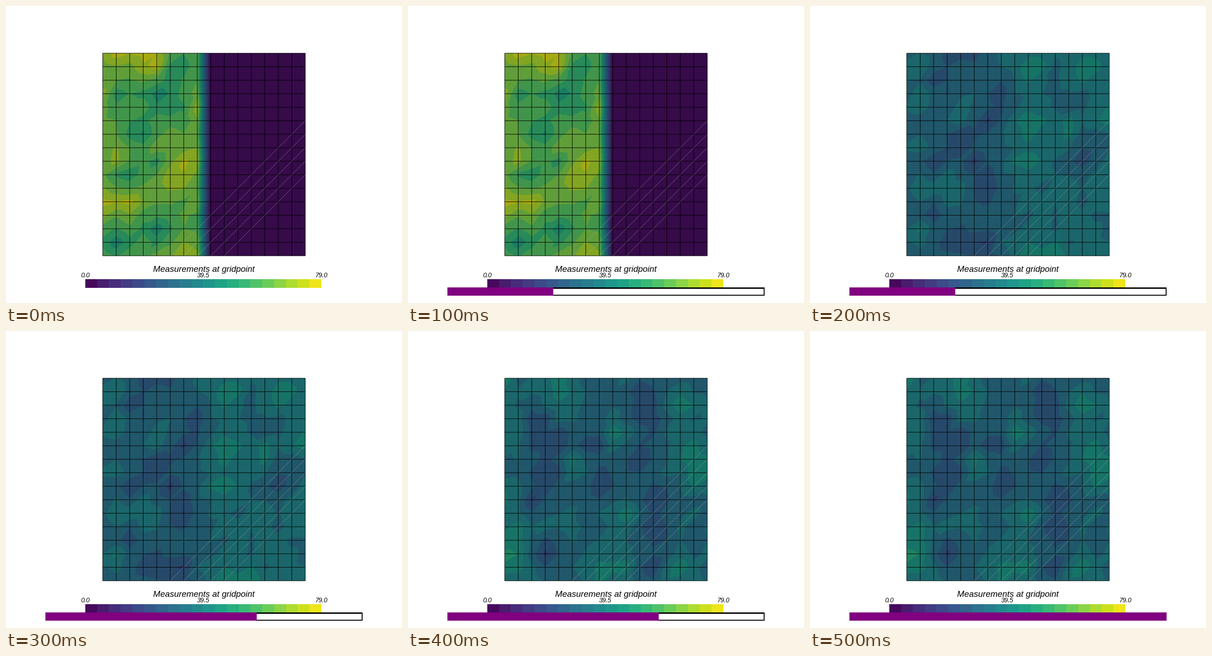
A matplotlib script for the animation above (0.6 s loop, 864 by 648 pixels).

```python
import matplotlib.pyplot as plt
import numpy as np
from matplotlib.animation import FuncAnimation
from matplotlib.patches import Rectangle

W, H, DPI = 864, 648, 100
PX = 72 / DPI
LEFT, TOP, SIDE, CELLS = 211, 103, 442, 15
RIGHT, BOTTOM = LEFT + SIDE, TOP + SIDE
STEP = SIDE / CELLS
SHADE = 0.75
VIRIDIS = plt.get_cmap("viridis")
ROWS, COLS = np.mgrid[:CELLS + 1, :CELLS + 1]


def bumps(points, spread=0.75):
    """Sum of round hills at (row, column) positions."""
    return sum(np.exp(-((ROWS - r)**2 + (COLS - c)**2) / (2 * spread**2))
               for r, c in points)


def measure(base, height, peaks, depth, dips, seed):
    """Node values: level ground, hills, hollows and a little noise."""
    noise = np.random.default_rng(seed).normal(0, 0.3, ROWS.shape)
    return base + height * bumps(peaks) - depth * bumps(dips) + noise


def render(nodes, centre, step):
    """Interpolate over triangles, then colour in bands around centre."""
    t = (np.arange(SIDE) + 0.5) / STEP
    cell = t.astype(int)
    r, c = np.meshgrid(cell, cell, indexing="ij")
    w, u = np.meshgrid(t - cell, t - cell, indexing="ij")
    a, b = nodes[r, c], nodes[r, c + 1]
    d, e = nodes[r + 1, c], nodes[r + 1, c + 1]
    z = np.where(u + w <= 1, a + u * (b - a) + w * (d - a),
                 e + (1 - u) * (d - e) + (1 - w) * (b - e))
    value = np.clip(centre + step * np.round(z), 0, 1)
    return VIRIDIS(value)[..., :3] * SHADE


def box(x0, y0, x1, y1, color, z):
    return ax.add_patch(Rectangle((x0, y0), x1 - x0, y1 - y0, fc=color, lw=0, zorder=z))


def label(x, baseline, text, size):
    ax.text(x, baseline, text, family="Liberation Sans", style="italic",
            size=size * PX, ha="center", va="baseline", zorder=6)


hot = measure(
    0.55, 2.3,
    [(0, 1), (0, 3), (1, 4), (3, 0), (4, 7), (7, 4), (8, 1), (8, 6.5), (9, 5),
     (11, 0), (11, 1.7), (15, 6)],
    2.7,
    [(3, 1), (3, 4), (4, 5.7), (1, 5.5), (6, 3), (8, 4), (9, 1.5), (13, 4), (14, 1)],
    seed=1)
hot[:, 8:] = -10.5  # the right half reads zero

even = measure(
    np.linspace(-0.1, 0.9, CELLS + 1), 1.8,
    [(1, 1), (1, 9), (1, 13), (3.5, 1), (5, 4), (5, 9), (5, 12), (5, 14.5),
     (7, 1), (8, 9), (10, 1), (10, 3), (13, 1), (15, 9), (15, 11)],
    1.8,
    [(0, 4.5), (2, 2), (3, 7), (5, 6), (4, 12.5), (6, 4), (6, 14), (8, 2),
     (8, 5), (8, 13), (10, 6), (12, 2), (14, 4), (14, 6)],
    seed=2)

spotted = measure(
    0.3, 2,
    [(0, 0), (0, 4), (2, 4), (2, 13), (4, 1), (4, 8.5), (5, 14), (6, 5), (7, 14.5),
     (9, 0.5), (10, 9), (11.5, 0.8), (13, 0), (14, 1), (14, 7), (14, 9), (14, 13)],
    1.9,
    [(1, 10), (3, 2.5), (3, 10.5), (4.5, 2), (5, 4), (5, 6.5), (6, 10), (7, 3),
     (8, 7), (9, 2), (9, 11), (11, 11), (13, 3), (14, 10.5)],
    seed=3)

images = [render(hot, 0.74, 0.07), render(even, 0.39, 0.08), render(spotted, 0.39, 0.08)]

fig = plt.figure(figsize=(W / DPI, H / DPI), dpi=DPI, facecolor="white")
ax = fig.add_axes([0, 0, 1, 1])
ax.axis("off")
surface = ax.imshow(images[0], extent=(LEFT, RIGHT, BOTTOM, TOP),
                    interpolation="nearest", aspect="auto", zorder=1)
ax.set(xlim=(0, W), ylim=(H, 0))

# Mesh edges, with thin seams along some cell diagonals
for k in range(CELLS + 1):
    x, y = LEFT + k * STEP, TOP + k * STEP
    style = dict(color="black", lw=PX, snap=False, solid_capstyle="butt", zorder=3)
    ax.plot([x, x], [TOP, BOTTOM], **style)
    ax.plot([LEFT, RIGHT], [y, y], **style)
    if 5 <= k < 10:
        ax.plot([x, RIGHT], [BOTTOM, y], color="0.7", lw=0.7 * PX, alpha=0.5, zorder=4)

# Colour bar
BAR_LEFT, BAR_RIGHT, BANDS = 173, 688, 20
scale = VIRIDIS((np.arange(BANDS) + 0.5) / BANDS)[None, :, :3]
ax.imshow(scale, extent=(BAR_LEFT, BAR_RIGHT, 615, 596),
          interpolation="nearest", aspect="auto", zorder=2)
ax.set(xlim=(0, W), ylim=(H, 0))
label(432, 580, "Measurements at gridpoint", 18.75)
for part, text in ((0, "0.0"), (0.5, "39.5"), (1, "79.0")):
    label(BAR_LEFT + part * (BAR_RIGHT - BAR_LEFT), 592, text, 14)

# Progress bar
P_LEFT, P_TOP, P_RIGHT, P_BOTTOM, RIM = 86, 614, 778, 632, 2.5
frame_box = box(P_LEFT, P_TOP, P_RIGHT, P_BOTTOM, "black", 7)
inner_box = box(P_LEFT + RIM, P_TOP + RIM, P_RIGHT - RIM, P_BOTTOM - RIM, "white", 8)
fill_box = box(P_LEFT, P_TOP, P_LEFT, P_BOTTOM, "purple", 9)


def update(frame):
    done = (frame + 1) // 2
    surface.set_data(images[frame // 2])
    fill_box.set_width((P_RIGHT - P_LEFT) * done / 3)
    for part in (frame_box, inner_box, fill_box):
        part.set_visible(done > 0)
    return surface, frame_box, inner_box, fill_box


anim = FuncAnimation(fig, update, frames=6, interval=100, repeat=True, repeat_delay=0)
plt.show()
```
